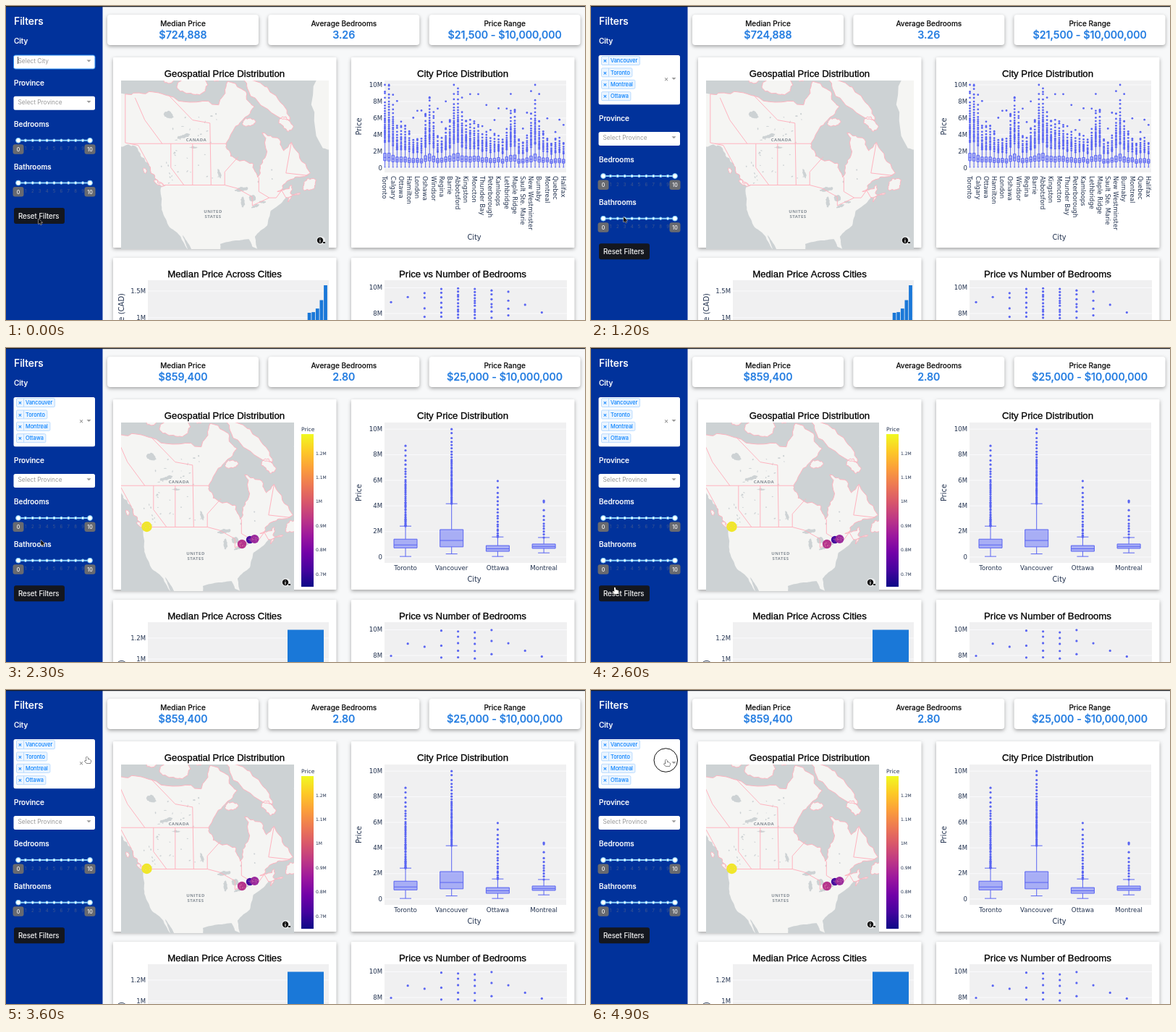
Write an HTML page with a canvas that moves like this. It is 800 by 434 pixels and loops after 5000 ms.

```html
<!DOCTYPE html>
<html lang="en">
<head>
<meta charset="utf-8">
<title>Housing dashboard</title>
<style>
  html, body { margin: 0; width: 100%; height: 100%; overflow: hidden; background: #f7f8f9; }
  canvas { display: block; width: 800px; height: 434px; }
</style>
</head>
<body>
<canvas id="stage" width="800" height="434"></canvas>
<script>
const ctx = document.getElementById('stage').getContext('2d');
const UI = 'Inter, sans-serif', ARIAL = '"Liberation Sans", sans-serif', AXIS = '"DejaVu Sans", sans-serif';
const INK = '#22324f', BLUE = '#5a65f2', BAR = '#1a78d8', LAND = '#f5f5f3', WATER = '#cdd2d4', PINK = '#ffb3bf';
const LOOP = 5000, STEP = 100;

let seed = 1;
const rnd = () => (seed = seed * 16807 % 2147483647) / 2147483647;
const range = n => [...Array(n).keys()];

function text(s, x, y, font, fill, { align = 'left', base = 'alphabetic', turn = 0, heft = 0 } = {}) {
  ctx.save();
  ctx.translate(x, y);
  ctx.rotate(turn);
  ctx.font = font;
  ctx.fillStyle = ctx.strokeStyle = fill;
  ctx.textAlign = align;
  ctx.textBaseline = base;
  ctx.lineWidth = heft;
  ctx.fillText(s, 0, 0);
  if (heft) ctx.strokeText(s, 0, 0);
  ctx.restore();
}
function rect(x, y, w, h, fill, r = 0, stroke) {
  ctx.beginPath();
  ctx.roundRect(x, y, w, h, r);
  ctx.fillStyle = fill;
  ctx.fill();
  if (stroke) { ctx.strokeStyle = stroke; ctx.lineWidth = 1; ctx.stroke(); }
}
function dot(x, y, r, fill, stroke) {
  ctx.beginPath();
  ctx.arc(x, y, r, 0, 7);
  if (fill) { ctx.fillStyle = fill; ctx.fill(); }
  if (stroke) { ctx.strokeStyle = stroke; ctx.lineWidth = 1; ctx.stroke(); }
}
function line(points, color, width = 1) {
  ctx.beginPath();
  points.forEach(p => ctx.lineTo(...p));
  ctx.strokeStyle = color;
  ctx.lineWidth = width;
  ctx.stroke();
}
function area(points, fill) {
  ctx.beginPath();
  points.forEach(p => ctx.lineTo(...p));
  ctx.fillStyle = fill;
  ctx.fill();
}
function card(x, y, w, h, r) {
  ctx.save();
  ctx.shadowColor = 'rgba(0,0,0,.34)';
  ctx.shadowBlur = 5;
  ctx.shadowOffsetY = 2;
  rect(x, y, w, h, '#fff', r);
  ctx.restore();
}

// ---- map: Mercator, shorelines roughened between a few key points ----
const project = ([lon, lat]) => [587.8 + 3 * lon, 416.6 - 171.9 * Math.log(Math.tan(Math.PI / 4 + lat * Math.PI / 360))];
function rough(pts, k = 0.2, depth = 3) {
  if (!depth) return pts;
  const out = [pts[0]];
  for (let i = 1; i < pts.length; i++) {
    const [a, b] = [pts[i - 1], pts[i]], len = Math.min(16, Math.hypot(b[0] - a[0], b[1] - a[1]));
    out.push([0, 1].map(j => (a[j] + b[j]) / 2 + (rnd() - 0.5) * len * k * 2), b);
  }
  return rough(out, k, depth - 1);
}
const coast = (pts, k) => rough(pts.map(project), k);
// irregular ellipse: place, half sizes in pixels, tilt
function blob([place, rx, ry, tilt = 0]) {
  const [cx, cy] = project(place), c = Math.cos(tilt), s = Math.sin(tilt);
  const ring = range(9).map(i => {
    const a = i * Math.PI * 2 / 9, m = 0.88 + rnd() * 0.24, x = Math.cos(a) * rx * m, y = Math.sin(a) * ry * m;
    return [cx + x * c - y * s, cy + x * s + y * c];
  });
  return rough([...ring, ring[0]], 0.22, 2);
}

seed = 42;
const arctic = coast([[-141, 69.6], [-130, 70], [-115, 68.4], [-98, 67.8], [-94, 71.5], [-85, 69.6], [-81.5, 67.5], [-87, 65],
  [-94.6, 60], [-92.5, 57], [-82.5, 55.2], [-80, 51.3], [-79, 54.5], [-76.7, 56.5], [-78, 62.4], [-70, 61], [-68, 58.3], [-64.5, 60.3]]);
const atlantic = coast([[-64.5, 60.3], [-55.8, 52.5], [-66.5, 50.2], [-71, 47], [-64.5, 49], [-65, 46.4], [-60.3, 46.5],
  [-66, 43.6], [-64.5, 45.4], [-67, 45]]);
const south = coast([[-67, 45], [-70.5, 42.5], [-74, 40.6], [-75.6, 35.3], [-81.3, 31], [-80.2, 26], [-82.5, 27], [-84, 30],
  [-90, 29.5], [-97.3, 28], [-97.3, 25], [-110, 25], [-114.7, 31.6], [-112, 25], [-117.2, 32.6], [-120.6, 34.6],
  [-124.2, 41], [-124.6, 48.3], [-122.6, 48.8]], 0.06);
const pacific = coast([[-122.6, 48.8], [-127.5, 51.2], [-130, 54.5]], 0.3);
const gulf = coast([[-130, 54.5], [-135, 58.3], [-140, 59.8], [-150, 60]]);
const mainland = [project([-150, 70.2]), ...arctic, ...atlantic, ...south, ...pacific, ...gulf];
const greenland = blob([[-45, 68], 28, 66]);
const islands = [
  [[-76, 69], 46, 12, 0.76], [[-67, 64.3], 12, 7, 0.8], [[-110, 71], 23, 13], [[-121, 72.2], 10, 9], [[-99, 72.3], 8, 7],
  [[-84, 64.6], 9, 6], [[-56.2, 49.2], 10, 8, -0.6], [[-125.6, 49.6], 8, 2.2, 0.6], [[-132, 53.2], 2, 4, -0.4]
].map(blob);
const lakes = [
  [[-87.5, 47.7], 10, 3, -0.2], [[-87, 43.7], 2.6, 8], [[-82.5, 44.9], 5, 5], [[-81.2, 42.2], 6, 1.8, -0.35],
  [[-77.8, 43.6], 5, 1.6], [[-97.7, 52.3], 2, 7, -0.3], [[-114, 61.7], 10, 2.4, -0.3], [[-121, 66], 7, 4.5, 0.4], [[-109.5, 59.1], 6, 1.2]
].map(blob);
const ponds = range(70).map(() => blob([[-125 + rnd() * 60, 49 + rnd() * 18], 0.5 + rnd() * 1.5, 0.5 + rnd() * 0.6, rnd() * 3]))
  .filter(([[x, y]]) => Math.hypot((x - 332) / 48, (y - 190) / 55) > 1);
const borders = [
  [[-141, 69.6], [-141, 60.2], [-135, 59.6], [-130, 54.6]],
  [[-139, 60], [-94.6, 60]], [[-123, 49], [-95.2, 49], [-95.2, 52.8], [-89, 56.8]],
  [[-120, 60], [-120, 54], [-114, 49]], [[-110, 60], [-110, 49]], [[-101.5, 49], [-102, 64.4], [-110, 65], [-121, 69.4]],
  [[-124, 60], [-132, 65], [-136.5, 69]], [[-79.5, 51.3], [-79.5, 47], [-74.7, 45], [-71.5, 45], [-69, 47.4], [-67, 45]],
  [[-57, 51.8], [-67, 52.5], [-64.5, 60.3]], [[-95.2, 49], [-89.5, 48], [-82.5, 45.3], [-82.5, 42.4], [-74.7, 45]]
].map(b => b.map(project));

function drawMap(filtered) {
  const right = filtered ? 398 : 446;
  ctx.save();
  ctx.beginPath();
  ctx.rect(159, 103, right - 159, 233);
  ctx.clip();
  ctx.fillStyle = WATER;
  ctx.fillRect(159, 103, 287, 233);
  ctx.translate(filtered ? -24 : 0, 0);
  ctx.lineJoin = 'round';
  [mainland, greenland, ...islands].forEach(p => area(p, LAND));
  [...lakes, ...ponds].forEach(p => area(p, WATER));
  [arctic, atlantic, pacific, ...islands, ...borders].forEach(p => line(p, PINK));
  ctx.letterSpacing = '0.5px';
  [['CANADA', 263, 186.5], ['UNITED', 286, 286], ['STATES', 286, 292.5]].forEach(([s, x, y]) =>
    text(s, x, y, '700 6px "Open Sans", sans-serif', '#858d95', { align: 'center' }));
  ctx.letterSpacing = '0px';
  if (filtered) {
    const marks = [[218.5, 247, 7.2, '#f0e72a'], [350, 271, 6.2, '#b5358c'], [361, 265, 5.2, '#43089c'], [367.5, 264, 6, '#9a2a9c']];
    seed = 5;
    for (const [x, y, r, color] of marks) {
      dot(x, y, r, color);
      for (let i = 0; i < 12; i++) dot(x + (rnd() - 0.5) * r * 1.3, y + (rnd() - 0.5) * r * 1.3, 0.5, 'rgba(255,190,190,.5)');
    }
  }
  ctx.restore();
  const x = right - 12;
  rect(x - 5, 318.5, 12, 11, 'rgba(255,255,255,.6)', 5);
  dot(x, 324, 4.2, '#111');
  text('i', x, 326.5, '700 7px ' + UI, '#fff', { align: 'center' });
  rect(x + 4, 326, 3, 2, '#222');
  if (filtered) drawScale();
}

function drawScale() {
  const g = ctx.createLinearGradient(0, 330, 0, 119);
  ['#0d0887', '#46039f', '#7201a8', '#9c179e', '#bd3786', '#d8576b', '#ed7953', '#fb9f3a', '#fdca26', '#f0f921']
    .forEach((c, i) => g.addColorStop(i / 9, c));
  rect(408, 119, 17, 211, g);
  text('Price', 408, 115, '7.5px ' + AXIS, INK);
  range(6).forEach(i => text((12 - i) / 10 + 'M', 428, 146 + i * 33.4, '6px ' + AXIS, INK, { base: 'middle' }));
}

// ---- charts ----
function plotArea(x, y, w, h, ticks) {
  rect(x, y, w, h, '#f0f0f1');
  for (const [label, ty] of ticks) {
    line([[x, ty], [x + w, ty]], '#fafafc');
    text(label, x - 3, ty + 0.5, '8.5px ' + AXIS, INK, { align: 'right', base: 'middle' });
  }
}
const priceTicks = Y => range(6).map(i => [i ? i * 2 + 'M' : '0', Y(i * 2)]);
const whisker = (q1, q3) => q3 + 1.5 * (q3 - q1);
function boxPlot(x, w, [lo, q1, med, q3], Y, cap = w / 4) {
  const hi = whisker(q1, q3);
  line([[x, Y(lo)], [x, Y(q1)]], BLUE);
  line([[x, Y(q3)], [x, Y(hi)]], BLUE);
  for (const v of [lo, hi]) line([[x - cap, Y(v)], [x + cap, Y(v)]], BLUE);
  rect(x - w / 2, Y(q3), w, Y(q1) - Y(q3), 'rgba(99,110,250,.5)', 0, BLUE);
  line([[x - w / 2, Y(med)], [x + w / 2, Y(med)]], BLUE);
}
// dense run of outliers that thins out towards the top
function outliers(x, from, to, Y, r, gap) {
  for (let v = from; v < to; v += gap * (0.5 + rnd() + 4 * ((v - from) / (to - from)) ** 3)) dot(x, Y(v), r, BLUE);
  dot(x, Y(to), r, BLUE);
}

const cities = ['Toronto', 'Calgary', 'Ottawa', 'Hamilton', 'London', 'Oshawa', 'Windsor', 'Regina', 'Barrie', 'Abbotsford',
  'Kingston', 'Moncton', 'Thunder Bay', 'Peterborough', 'Kamloops', 'Lethbridge', 'Maple Ridge', 'Sault Ste. Marie',
  'New Westminster', 'Burnaby', 'Montreal', 'Quebec', 'Halifax'];
const peaks = [0.6, 11, 17.4, 31.4, 37];

function allCities() {
  const Y = v => 224 - 11.5 * v, X = i => 523.5 + 5.61 * i;
  plotArea(523, 103, 251, 127, priceTicks(Y));
  seed = 11;
  for (let i = 0; i < cities.length * 2 - 1; i++) {
    const swell = peaks.reduce((sum, p) => sum + Math.exp(-((i - p) ** 2) / 1.6), 0);
    const top = Math.min(9.9, (3.6 + 1.2 * Math.cos(i * 0.3)) * (1 - (i / 60) ** 2) + rnd() * 1.6 + 5.5 * swell);
    const q1 = 0.45 + top * 0.04 + rnd() * 0.15, q3 = q1 + 0.25 + top * 0.07;
    boxPlot(X(i), 3.4, [0.1, q1, (q1 + q3) / 2 - 0.05, q3], Y, 1);
    outliers(X(i), whisker(q1, q3), top, Y, 1.4, 0.17);
    dot(X(i), Y(Math.min(10, top + rnd() ** 2 * 4)), 1.4, BLUE);
  }
  cities.forEach((c, i) => text(c, X(i * 2) - 1, 235, '8.5px ' + AXIS, INK, { base: 'middle', turn: Math.PI / 2 }));
}
function fourCities() {
  const Y = v => 289 - 17.68 * v;
  plotArea(523, 103, 251, 194, priceTicks(Y));
  seed = 23;
  [['Toronto', [0.05, 0.72, 0.95, 1.4], 8.7], ['Vancouver', [0.25, 0.8, 1.3, 2.15], 10],
    ['Ottawa', [0.05, 0.45, 0.65, 0.9], 5.95], ['Montreal', [0.33, 0.68, 0.83, 1.02], 4.4]
  ].forEach(([name, stats, top], i) => {
    const x = 552 + i * 63.7;
    boxPlot(x, 32, stats, Y);
    outliers(x, whisker(stats[1], stats[3]), top, Y, 1.6, 1 / top);
    text(name, x, 307, '8.6px ' + AXIS, INK, { align: 'center' });
  });
}
function drawBars(filtered) {
  plotArea(196, 379, 250, 60, filtered ? [['1.2M', 401], ['1M', 430]] : [['1.5M', 394], ['1M', 431]]);
  if (filtered) rect(389, 389.5, 50, 50, BAR);
  else range(5).forEach(i => rect(416.7 + i * 5.6, 424 - 38 * (i / 4) ** 2.7, 4.8, 50, BAR));
  text('Median Price (CAD)', 160, filtered ? 431 : 397, '10px ' + AXIS, INK, { align: 'right', base: 'middle', turn: -Math.PI / 2 });
}
// one column per bedroom count, fullest around four
function drawRooms(filtered) {
  plotArea(523, 379, 252, 60, [['10M', 389.5], ['8M', 425]]);
  seed = 9;
  for (let i = 0; i < 10; i++) {
    const off = Math.abs(i - 4.5), n = Math.ceil((filtered ? 5 : 11) * Math.exp(-((off / (filtered ? 1.6 : 2.2)) ** 2)));
    const y0 = 389.5 + Math.max(0, off - 1.5) ** 2 * (filtered ? 4 : 2.2), gap = (434 - y0) / n;
    for (let j = 0; j < n; j++) dot(532 + i * 23.15, y0 + gap * (j + rnd() * 0.6), 1.6, BLUE);
  }
}

function drawMain(filtered) {
  rect(133, 0, 667, 434, '#f7f8f9');
  const kpis = filtered ? ['$859,400', '2.80', '$25,000 - $10,000,000'] : ['$724,888', '3.26', '$21,500 - $10,000,000'];
  ['Median Price', 'Average Bedrooms', 'Price Range'].forEach((name, i) => {
    const x = 140 + i * 222.3;
    card(x, 12, 209, 42, 4);
    text(name, x + 104.5, 28, '500 10px ' + UI, '#111', { align: 'center', heft: 0.15 });
    text(kpis[i], x + 104.5, 45, '500 14.4px ' + UI, '#1f7ae0', { align: 'center', heft: 0.25 });
  });
  for (const x of [148, 477]) for (const y of [71, 348]) card(x, y, 308.5, 263, 1);
  drawMap(filtered);
  (filtered ? fourCities : allCities)();
  text('City', 647, 323, '9.8px ' + AXIS, INK, { align: 'center' });
  text('Price', 488.5, filtered ? 200 : 166.5, '9.8px ' + AXIS, INK, { align: 'center', base: 'middle', turn: -Math.PI / 2 });
  drawBars(filtered);
  drawRooms(filtered);
  ['Geospatial Price Distribution', 'City Price Distribution', 'Median Price Across Cities', 'Price vs Number of Bedrooms']
    .forEach((s, i) => text(s, i % 2 ? 631 : 302, i < 2 ? 98 : 374.7, '13.2px ' + ARIAL, '#000', { align: 'center', heft: 0.3 }));
}

// ---- sidebar ----
const label = (s, y) => text(s, 11, y, '500 10px ' + UI, '#fff', { heft: 0.2 });
const hint = (s, y) => text(s, 16.5, y, '8.3px ' + UI, '#999');
const arrowDown = y => area([[111.5, y - 1.5], [117.5, y - 1.5], [114.5, y + 1.5]], '#999');
function slider(name, y) {
  label(name, y - 19);
  line([[17, y], [116, y]], '#8fd3fb', 2);
  for (let i = 0; i <= 10; i++) {
    const x = 17 + i * 9.9, end = i % 10 === 0;
    dot(x, y, end ? 3.4 : 1.8, '#fff', '#6fc3f7');
    if (end) rect(x - 7.5, y + 5.5, 15, 13.5, '#686a70', 3);
    text(i, x, y + (end ? 15 : 13.5), (end ? '500 7px ' : '6px ') + UI, end ? '#fff' : '#42588f', { align: 'center' });
  }
}
function drawSidebar(chips, focus) {
  const grow = Math.max(0, chips - 1) * 16.4;
  rect(0, 0, 133.5, 434, '#01329b');
  text('Filters', 11, 26, '500 13.8px ' + UI, '#fff', { heft: 0.2 });
  label('City', 52);
  rect(10.5, 68, 112.5, 19 + grow, '#fff', 2.5, focus && '#2b8cf0');
  if (!chips) {
    hint('Select City', 78.5);
    line([[16.5, 70], [16.5, 80]], '#333', 0.8);
  }
  ['Vancouver', 'Toronto', 'Montreal', 'Ottawa'].slice(0, chips).forEach((name, i) => {
    const y = 75.5 + i * 16.4;
    ctx.font = '7.4px ' + UI;
    rect(14.5, y - 6, ctx.measureText(name).width + 15.5, 12, '#ebf5ff', 1.5, '#b9dbff');
    line([[24.5, y - 6], [24.5, y + 6]], '#b9dbff');
    text('×', 19.5, y + 2.6, '8px ' + UI, '#007eff', { align: 'center', heft: 0.2 });
    text(name, 27, y + 2.6, '7.4px ' + UI, '#007eff', { heft: 0.1 });
  });
  const mid = 76 + grow / 2;
  if (chips) text('×', 104, mid + 3, '10px ' + UI, '#888', { align: 'center' });
  arrowDown(mid);
  ctx.save();
  ctx.translate(0, grow);
  label('Province', 109.5);
  rect(10.5, 124.7, 112.5, 19, '#fff', 2.5);
  hint('Select Province', 135.5);
  arrowDown(132.5);
  slider('Bedrooms', 185.8);
  slider('Bathrooms', 244.5);
  rect(11, 279, 70, 22, '#14171f', 3);
  text('Reset Filters', 17, 293.5, '9.7px ' + UI, '#fff', { heft: 0.15 });
  ctx.restore();
}

// ---- pointer: time and place of each stop ----
const stops = [[0, 45, 294], [1200, 45, 291.5], [2000, 63.5, 200], [2600, 33, 331], [3600, 112, 92.5], [4400, 104, 96.5], [LOOP, 104, 96.5]];
function pointerAt(t) {
  const i = stops.findIndex(s => s[0] > t), [t0, x0, y0] = stops[i - 1], [t1, x1, y1] = stops[i];
  const u = (t - t0) / (t1 - t0), e = u * u * (3 - 2 * u);
  return [x0 + (x1 - x0) * e, y0 + (y1 - y0) * e];
}
const ARROW = new Path2D('M0 0V7.4L1.8 5.8L3 8.4L4.2 7.8L3.1 5.2H5.4Z');
const HAND = new Path2D('M-1 0Q.4-.6.8.6L1.2 3L4.6 4Q5.6 4.6 5.2 6.2L4.4 9H-.8L-3.2 5.8Q-3 4.6-1.8 5.2L-.8 6Z');
function drawPointer(t) {
  const [x, y] = pointerAt(t), hand = t >= 2000 && (y > 328 || (y < 136 && x > 95));
  const shape = hand ? HAND : ARROW;
  ctx.save();
  ctx.translate(x, y);
  ctx.lineJoin = 'round';
  ctx.lineWidth = 1;
  ctx.strokeStyle = hand ? '#111' : '#e8e0e0';
  ctx.fillStyle = hand ? '#fff' : '#111';
  ctx.stroke(shape);
  ctx.fill(shape);
  ctx.restore();
  if (t >= 4900) dot(103.3, 97, 16.3, null, '#111');
}

function draw(t) {
  const filtered = t >= 2300, chips = Math.min(4, Math.max(0, Math.floor((t - 100) / 200)));
  drawMain(filtered);
  drawSidebar(chips, t < 1000);
  rect(0, 0, 800, 1.2, '#1d1f24');
  drawPointer(t);
}

const start = performance.now();
let last = -1;
function tick() {
  const t = Math.floor((performance.now() - start) % LOOP / STEP) * STEP;
  if (t !== last) draw(last = t);
  requestAnimationFrame(tick);
}
tick();
</script>
</body>
</html>
```
